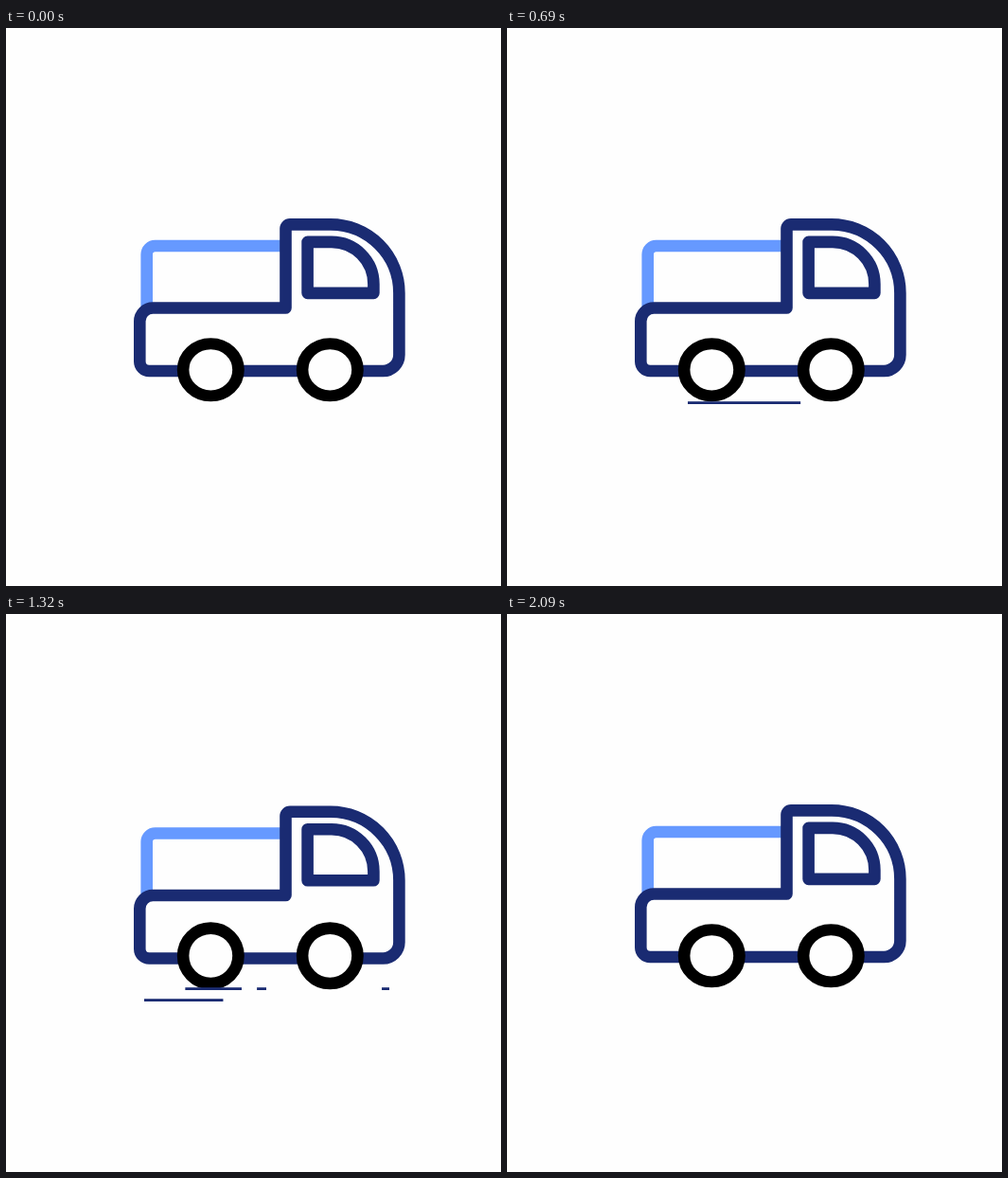
Write an HTML page with a canvas that moves like this. It is 523 by 589 pixels and loops after 2.16 s.

```html
<!DOCTYPE html>
<html lang="en">
<head>
<meta charset="utf-8">
<title>Truck</title>
<style>
html, body { margin: 0; width: 100%; height: 100%; overflow: hidden; background: #fefefe; }
canvas { display: block; width: 523px; height: 589px; }
</style>
</head>
<body>
<canvas id="stage" width="523" height="589"></canvas>
<script>
const ctx = document.getElementById('stage').getContext('2d');
const NAVY = '#1a2b72', BLUE = '#6699ff', PAPER = '#fefefe';
const LOOP = 2160, STEP = 70, STROKE = 12.6;

// A streak runs from right to left: its head leaves first, its tail follows.
// Head and tail are [start, end] in steps.
const streaks = [
  { y: 395.6, from: 423, to: 146, head: [3.3, 11.3], tail: [7.25, 14] },
  { y: 407.6, from: 423.5, to: 146, head: [11.08, 18.1], tail: [14, 21.15] },
  { y: 395.6, from: 275, to: 146, head: [15.05, 21], tail: [17.8, 23.75] },
  { y: 395.6, from: 275, to: 146, head: [18.46, 25.5], tail: [22, 28] },
  { y: 395.6, from: 405, to: 300, head: [18.48, 25.35], tail: [21, 26.5] }
];

const progress = (k, [a, b]) => Math.min(1, Math.max(0, (k - a) / (b - a)));

function drawStreak(s, k) {
  const at = range => s.from + (s.to - s.from) * progress(k, range);
  const left = at(s.head), right = at(s.tail);
  if (right > left) ctx.fillRect(left, s.y - 1.4, right - left, 2.8);
}

function drawCargo() {
  ctx.strokeStyle = BLUE;
  ctx.beginPath();
  ctx.moveTo(148.7, 294);
  ctx.arcTo(148.7, 230, 170, 230, 9);
  ctx.lineTo(295, 230);
  ctx.stroke();
}

function drawBody() {
  ctx.strokeStyle = NAVY;
  ctx.beginPath();
  ctx.moveTo(295.5, 295.5);
  ctx.arcTo(295.5, 207.3, 320, 207.3, 4.5);
  ctx.lineTo(343, 207.3);
  ctx.arcTo(415.4, 207.3, 415.4, 300, 72.4);
  ctx.arcTo(415.4, 362, 380, 362, 17);
  ctx.arcTo(141.3, 362, 141.3, 340, 10);
  ctx.arcTo(141.3, 295.5, 170, 295.5, 14);
  ctx.closePath();
  ctx.stroke();
}

function drawWindow() {
  ctx.beginPath();
  ctx.moveTo(318.6, 279.8);
  ctx.lineTo(318.6, 225.8);
  ctx.lineTo(344, 225.8);
  ctx.arcTo(388.4, 225.8, 388.4, 279.8, 44.4);
  ctx.lineTo(388.4, 279.8);
  ctx.closePath();
  ctx.stroke();
}

function drawWheel(x, squash) {
  ctx.save();
  ctx.translate(x, 360.8);
  ctx.scale(1, squash);
  ctx.beginPath();
  ctx.arc(0, 0, 29.2, 0, Math.PI * 2);
  ctx.fillStyle = PAPER;
  ctx.fill();
  ctx.stroke();
  ctx.restore();
}

function draw(time) {
  const t = time % LOOP;
  const k = t < STEP ? 0 : Math.floor((t + 10) / STEP);
  const bounce = 0.5 + 0.5 * Math.cos(2 * Math.PI * (k - 4) / 2.5);

  ctx.fillStyle = PAPER;
  ctx.fillRect(0, 0, 523, 589);
  ctx.lineWidth = STROKE;
  ctx.lineJoin = 'round';

  ctx.save();
  ctx.translate(0, 1.6 * bounce - 0.1);
  drawCargo();
  drawBody();
  drawWindow();
  ctx.restore();

  for (const x of [216.3, 342.3]) drawWheel(x, 0.94 + 0.06 * bounce);

  ctx.fillStyle = NAVY;
  for (const s of streaks) drawStreak(s, k);
}

const start = performance.now();
function tick() {
  draw(performance.now() - start);
  requestAnimationFrame(tick);
}
tick();
</script>
</body>
</html>
```
